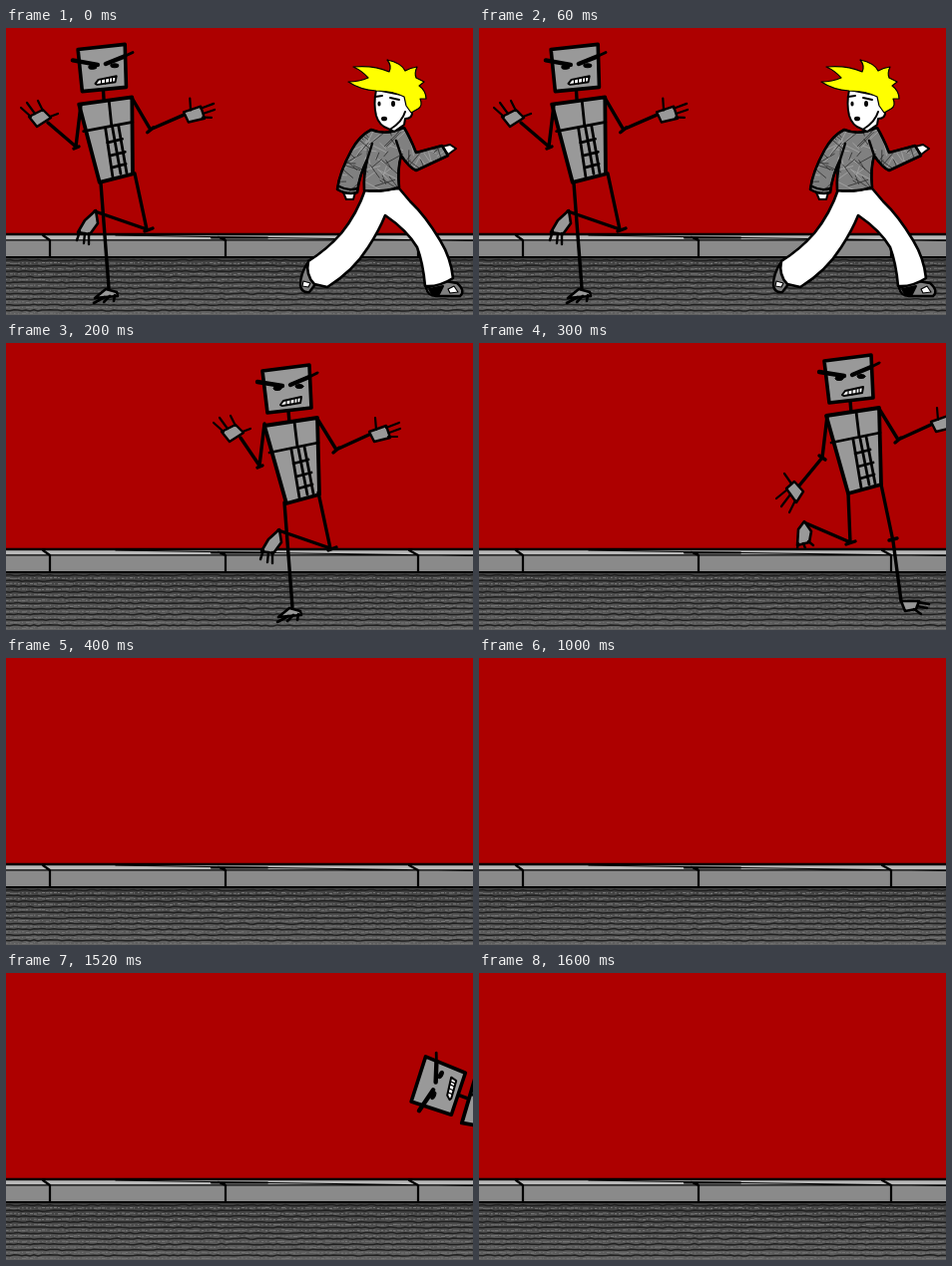
An HTML page that plays this animation: 468x288 px, repeating every 1.7 s.

```html
<!DOCTYPE html>
<html lang="en">
<head>
<meta charset="utf-8">
<title>Street chase</title>
<style>
  html, body { margin: 0; width: 100%; height: 100%; overflow: hidden; background: #ad0000; }
  svg { display: block; width: 100vw; height: 100vh; }
  .ink { fill: none; stroke: #000; stroke-linecap: round; stroke-linejoin: round; }
  .metal { fill: #999; }
  .cloth { fill: #808080; }
  .white { fill: #fff; }
  .solid { fill: #000; }
</style>
</head>
<body>
<svg viewBox="0 0 468 288" preserveAspectRatio="none">
  <defs>
    <path id="coat" d="M366 102Q378 107 390 103L399 100Q405 110 411 125L437 118L443 128L411 143Q404 140 396 128Q392 142 394 160Q377 165 359 163Q358 148 362 132Q354 148 352 165Q342 168 332 162Q334 145 346 123Q354 108 366 102Z"/>
    <clipPath id="coatClip"><use href="#coat"/></clipPath>
    <linearGradient id="asphalt" x2="0" y2="1">
      <stop stop-color="#404040"/>
      <stop offset="1" stop-color="#606060"/>
    </linearGradient>
  </defs>

  <rect width="468" height="288" fill="#ad0000"/>
  <rect y="207" width="468" height="6" fill="#b8b8b8"/>
  <rect y="213" width="468" height="17" fill="#8a8a8a"/>
  <rect y="230" width="468" height="58" fill="url(#asphalt)"/>
  <g id="road" fill="none"></g>
  <g class="ink">
    <path stroke-width="2.6" d="M0 207H468"/>
    <path stroke-width="1.2" d="M0 212.8H468M110 208L262 210.5L468 213.5"/>
    <path stroke-width="2.2" d="M0 230H468M37 208L44 213V229M206 210.5H262M213 210L220 213V229M404 208L413 213V229"/>
  </g>

  <g id="boy" class="ink" stroke-width="2">
    <path class="white" d="M338 165L341 172H348L350 165ZM437 119L445 117L451 121L443 127Z"/>
    <path class="cloth" stroke-width="2.4" d="M302 236Q295 247 295 258Q296 266 304 265L310 257ZM421 261Q423 269 431 269H455Q461 264 452 256L440 254Z"/>
    <path class="solid" d="M424 262L438 259L434 267H427Z"/>
    <path class="white" stroke-width="1.2" d="M298 254L305 256L303 260L297 259ZM443 262L449 259L453 265L445 266Z"/>
    <path class="white" stroke-width="2.6" d="M360 162Q352 186 336 206Q322 222 303 234Q300 248 309 257L322 260Q348 244 363 220Q374 203 380 188Q402 203 412 220Q418 236 420 259Q434 260 448 251Q446 231 435 213Q420 188 405 174L394 161Z"/>
    <use href="#coat" class="cloth"/>
    <g id="weave" clip-path="url(#coatClip)"></g>
    <use href="#coat" stroke-width="2.6"/>
    <path stroke-width="2.4" d="M396 128L391 113M362 132L367 116M334 159Q343 164 352 161"/>
    <path class="white" d="M371 62Q368 76 371 88Q374 98 383 101L389 104L399 97L400 91Q408 91 407 83L401 68Z"/>
    <path d="M400 84Q397 94 386 101"/>
    <path fill="#ff0" stroke-width="1.2" d="M343 54Q354 54 363 50Q357 43 348 39Q368 37 384 44Q387 38 382 32Q396 35 400 43Q405 40 412 39Q409 45 411 50L419 54L414 58Q421 63 421 71L415 71Q418 78 413 81L406 85L401 78L399 69Q388 63 371 63Q355 62 343 54Z"/>
    <path d="M370 69L377 68M385 70L394 72"/>
    <ellipse class="solid" stroke="none" cx="374" cy="76" rx="1.6" ry="2.5"/>
    <ellipse class="solid" stroke="none" cx="388" cy="76" rx="2" ry="3"/>
    <ellipse class="solid" cx="379" cy="91" rx="2" ry="1.3"/>
  </g>

  <g id="robot" class="ink" stroke-width="3.4">
    <g id="body">
      <path d="M148 65L149 77M177 73L196 104L231 88M193 107L199 102"/>
      <path class="metal" stroke-width="3.6" d="M122 25L169 19L171 62L127 67Z"/>
      <path class="metal" stroke-width="3.8" d="M124 80L177 72L179 149L146 158Z"/>
      <path stroke-width="2.8" d="M129 107L178 97M154 76L157 101M151 104L159 152M158 103L167 149M164 101L173 148M153 118L168 114M156 131L171 127M158 143L172 139"/>
      <path class="metal" stroke-width="2.4" d="M229 86L246 80L250 92L234 96Z"/>
      <path stroke-width="2.2" d="M236 84L235 72M246 82L259 77M249 87L260 83M248 91L257 91"/>
      <path stroke-width="4.4" d="M117 36L142 40M150 39L169 31"/>
      <path stroke-width="2.8" d="M169 31L177 27"/>
      <ellipse class="solid" cx="137" cy="42.5" rx="4" ry="2" stroke-width="1"/>
      <ellipse class="solid" cx="159" cy="40.5" rx="4" ry="2" stroke-width="1"/>
      <path class="white" stroke-width="2" d="M140 59L143 55L161 51L160 57L142 60Z"/>
      <path stroke-width="1.2" d="M146 55V59M150 54V59M154 53V58M157 52V57"/>
    </g>
    <g id="hop">
      <path id="armUp"/>
      <g id="handUp">
        <path class="metal" stroke-width="2.4" d="M81 86L95 79L103 87L89 96Z"/>
        <path stroke-width="2.2" d="M83 86L73 77M87 83L79 72M95 80L90 70M102 86L110 83"/>
      </g>
      <path d="M144 157L152 262M178 147L190 203L138 185M188 205L196 202"/>
      <path class="metal" stroke-width="2.6" d="M139 184L128 194L121 206L133 208L141 197Z"/>
      <path stroke-width="2.4" d="M123 205L120 214M128 207L127 217M132 207L132 218"/>
      <path class="metal" stroke-width="2.6" d="M138 272L149 263L160 266L161 270L148 271Z"/>
      <path stroke-width="2.6" d="M148 271L137 277M153 270L147 276M158 269L157 275"/>
    </g>
    <g id="stride">
      <path d="M125 80L120 122L97 150M117 120L123 124"/>
      <path class="metal" stroke-width="2.4" d="M84 153L92 146L101 156L94 167Z"/>
      <path stroke-width="2.2" d="M89 148L82 138M85 154L74 163M88 159L79 171M93 165L87 177"/>
      <path d="M179 149L191 206L199 266M187 205L195 203M146 158L148 207L104 188M144 209L153 206"/>
      <path class="metal" stroke-width="2.6" d="M102 186L96 194L95 210L107 207L109 196Z"/>
      <path stroke-width="2.4" d="M96 208L95 213M101 208L103 213M106 206L111 210"/>
      <path class="metal" stroke-width="2.6" d="M199 266L217 266L214 274L203 276Z"/>
      <path stroke-width="2.4" d="M216 267L227 269M215 271L225 273M212 274L219 279"/>
    </g>
  </g>
</svg>
<script>
const $ = id => document.getElementById(id);
const LOOP = 1700;

// Each pose holds until the next start time.
const poses = [
  { at: 0, legs: 'hop', body: [-51, -3, 1], limbs: [-49, -1], reach: [-9, 4], boy: [0, 0] },
  { at: 100, legs: 'stride', body: [0, 0], limbs: [0, 0], boy: [84, 3] },
  { at: 200, legs: 'hop', body: [135, 3], limbs: [135, 3], reach: [0, 0] },
  { at: 300, legs: 'stride', body: [224, -7], limbs: [224, -7] },
  { at: 400 },
  { at: 1400, body: [286, 71, -65], pivot: [147, 43] },
  { at: 1600 }
];

function seeded(seed) {
  return () => (seed = (seed * 16807) % 2147483647) / 2147483647;
}

function addPath(parent, d, stroke, width) {
  const path = document.createElementNS('http://www.w3.org/2000/svg', 'path');
  path.setAttribute('d', d);
  path.setAttribute('stroke', stroke);
  path.setAttribute('stroke-width', width);
  parent.append(path);
}

function paveRoad() {
  const rand = seeded(41);
  for (let y = 233; y < 288; y += 5.6) {
    let dark = `M0 ${y}`, light = '';
    for (let x = 0; x < 468; x += 4) {
      dark += `L${x + 4} ${(y + rand() * 1.2 - .6).toFixed(1)}`;
      light += `M${x} ${(y + 2.4 + rand()).toFixed(1)}h${(1 + rand() * 3).toFixed(1)}`;
    }
    addPath($('road'), dark, '#202020', 1.5);
    addPath($('road'), light, '#757575', 1.1);
  }
}

function weaveCoat() {
  const rand = seeded(97);
  for (const [color, count] of [['#a8a8a8', 50], ['#2c2c2c', 75]]) {
    let d = '';
    for (let i = 0; i < count; i++) {
      const x = 330 + rand() * 112, y = 100 + rand() * 64;
      d += `M${x.toFixed(1)} ${y.toFixed(1)}l${(rand() * 40 - 20).toFixed(1)} ${(rand() * 36 - 18).toFixed(1)}`;
    }
    addPath($('weave'), d, color, .8);
  }
}

const show = (id, on) => $(id).setAttribute('display', on ? 'inline' : 'none');
const place = (id, [x, y, angle = 0], pivot = [150, 88]) =>
  $(id).setAttribute('transform', `translate(${x} ${y}) rotate(${angle} ${pivot})`);

function render(time) {
  const pose = poses.findLast(p => p.at <= time % LOOP);
  show('boy', pose.boy);
  show('robot', pose.body);
  if (pose.boy) place('boy', pose.boy);
  if (pose.body) place('body', pose.body, pose.pivot);
  for (const legs of ['hop', 'stride']) {
    show(legs, pose.legs === legs);
    if (pose.legs === legs) place(legs, pose.limbs);
  }
  if (pose.reach) {
    const [dx, dy] = pose.reach;
    place('handUp', pose.reach);
    $('armUp').setAttribute('d', `M124 78L119 120L${100 + dx} ${92 + dy}M117 122L122 120`);
  }
}

paveRoad();
weaveCoat();
const start = performance.now();
function tick() {
  render(performance.now() - start);
  requestAnimationFrame(tick);
}
tick();
</script>
</body>
</html>
```
